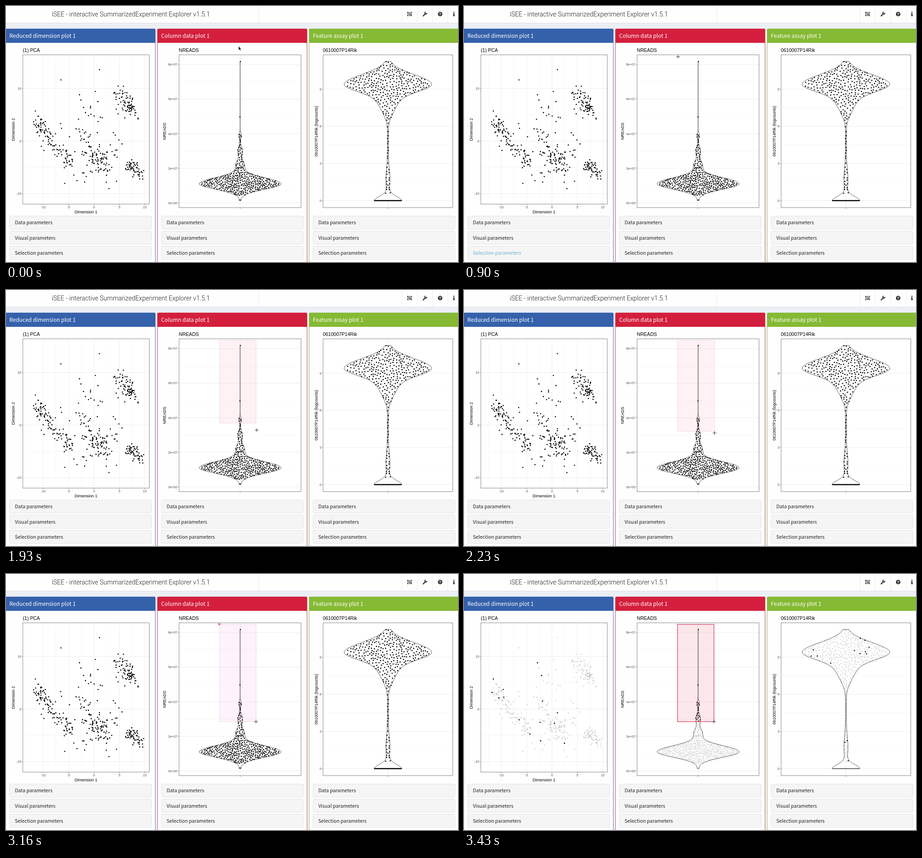
Write an HTML page that moves like this. It is 995 by 563 pixels and loops after 4.33 s.

```html
<!DOCTYPE html>
<html lang="en">
<head>
<meta charset="utf-8">
<title>iSEE panels</title>
<style>
html, body { margin: 0; width: 100%; height: 100%; overflow: hidden; background: #ecf0f5; }
svg { display: block; width: 995px; height: 563px; }
text { font-family: "Liberation Sans", Arial, sans-serif; fill: #000; }
.ui { font-family: "Noto Sans CJK JP", "Noto Sans CJK SC", "Noto Sans CJK", "Noto Sans", sans-serif; fill: #222; font-size: 10.75px; }
.head { font-size: 12.05px; fill: #fff; }
.brand { font: 300 14.1px Roboto, "Liberation Sans", sans-serif; fill: #222; }
.title { font-size: 10.6px; }
.axis { font-size: 9px; }
.tick { font-size: 7.2px; fill: #4d4d4d; }
.end { text-anchor: end; }
.mid { text-anchor: middle; }
.major { stroke: #e8e8e8; stroke-width: .8; }
.minor { stroke: #efefef; stroke-width: .5; }
.mark { stroke: #555; stroke-width: .7; }
.frame { fill: none; stroke: #6a6a6a; stroke-width: .8; }
.violin { fill: none; stroke: #3a3a3a; stroke-width: .85; }
</style>
</head>
<body>
<svg id="stage" viewBox="0 0 995 563"></svg>
<script>
const LOOP = 4330;

// ---------- helpers ----------
function rng(seed) {
  return () => {
    seed = (seed + 0x6d2b79f5) | 0;
    let z = Math.imul(seed ^ (seed >>> 15), 1 | seed);
    z = (z + Math.imul(z ^ (z >>> 7), 61 | z)) ^ z;
    return ((z ^ (z >>> 14)) >>> 0) / 4294967296;
  };
}
const rand = rng(20);
const gauss = () => Math.sqrt(-2 * Math.log(1 - rand())) * Math.cos(2 * Math.PI * rand());
const clamp = (v, lo, hi) => Math.min(hi, Math.max(lo, v));
const lerp = (a, b, p) => a + (b - a) * p;
const ramp = (t, from, to) => clamp((t - from) / (to - from), 0, 1);
const mix = (a, b, p) => `rgb(${a.map((v, i) => Math.round(lerp(v, b[i], p)))})`;
const line = (x1, y1, x2, y2, cls) => `<line x1="${x1}" y1="${y1}" x2="${x2}" y2="${y2}" class="${cls}"/>`;
const text = (x, y, cls, str, extra = "") => `<text x="${x}" y="${y}" class="${cls}" ${extra}>${str}</text>`;
const upright = (x, y, str) => text(x, y, "axis mid", str, `transform="rotate(-90 ${x} ${y})"`);
const rect = (x, y, w, h, attrs) => `<rect x="${x}" y="${y}" width="${w}" height="${h}" ${attrs}/>`;
const range = (from, to, n) => Array.from({ length: n }, (_, i) => lerp(from, to, i / (n - 1)));

const dots = pts => pts.map(([x, y]) => `<circle cx="${x.toFixed(1)}" cy="${y.toFixed(1)}" r="1.35"/>`).join("");
const cloud = (pts, picked) =>
  `<g class="rest">${dots(pts.filter((p, i) => !picked(p, i)))}</g><g>${dots(pts.filter(picked))}</g>`;

// bell curve with separate spreads above and below its peak
const bell = (y, peak, height, up, down = up) =>
  height * Math.exp(-(((y - peak) / (y < peak ? up : down)) ** 2) / 2);

function outline(width, cx, top, bottom) {
  const ys = range(top, bottom, bottom - top + 1);
  const side = dir => ys.map(y => `${(cx + dir * width(y)).toFixed(1)} ${y}`);
  return `<path class="violin" d="M${side(1).concat(side(-1).reverse()).join("L")}Z"/>`;
}

// evenly spaced random points inside a violin: of several tries keep the loneliest
function swarm(width, cx, top, bottom, n) {
  const widest = Math.max(...range(top, bottom, 100).map(width));
  const pick = () => {
    for (;;) {
      const y = lerp(top, bottom, rand()), w = width(y);
      if (rand() * widest < w) return [cx + (2 * rand() - 1) * w * 0.95, y];
    }
  };
  const pts = [];
  while (pts.length < n) {
    let best, far = -1;
    for (let k = 0; k < 14; k++) {
      const c = pick();
      const gap = pts.reduce((m, p) => Math.min(m, (p[0] - c[0]) ** 2 + (p[1] - c[1]) ** 2), 1e9);
      if (gap > far) [best, far] = [c, gap];
    }
    pts.push(best);
  }
  return pts;
}

// ---------- plots ----------
function grid(x0, x1, y1, xs, minorX, first, last, labels) {
  const y0 = 107.3, ys = range(first, last, labels.length), half = (ys[1] - ys[0]) / 2;
  return rect(x0, y0, x1 - x0, y1 - y0, 'fill="#fff"')
    + minorX.map(x => line(x, y0, x, y1, "minor")).join("")
    + ys.slice(1).map(y => line(x0, y - half, x1, y - half, "minor")).join("")
    + xs.map(x => line(x, y0, x, y1, "major") + line(x, y1, x, y1 + 2.5, "mark")).join("")
    + ys.map((y, i) => line(x0, y, x1, y, "major") + line(x0 - 2.5, y, x0, y, "mark")
      + text(x0 - 3.8, y + 2.6, "tick end", labels[i])).join("")
    + rect(x0, y0, x1 - x0, y1 - y0, 'class="frame"');
}

function pcaPlot() {
  const pts = [];
  const add = (x, y) => pts.push([clamp(x, 49, 303), clamp(y, 121, 421)]);
  const blob = (n, cx, cy, sx, sy, tilt = 0) => {
    for (let i = 0; i < n; i++) {
      const dx = gauss() * sx;
      add(cx + dx, cy + dx * tilt + gauss() * sy);
    }
  };
  for (let i = 0; i < 105; i++) {
    const u = rand() ** 1.2;
    add(72 + 78 * u ** 1.3 + gauss() * 7, 250 + 105 * u + gauss() * 10);
  }
  blob(36, 180, 298, 16, 22);
  blob(48, 206, 338, 15, 14, .2);
  blob(24, 190, 360, 28, 22);
  blob(14, 232, 325, 18, 25);
  blob(22, 175, 225, 55, 50);
  blob(52, 266, 212, 14, 14, .5);
  blob(22, 274, 222, 7, 8, .5);
  blob(56, 282, 359, 10, 9, .6);
  const xs = range(82, 305.5, 5);
  return grid(37, 315.3, 435.7, xs, range(54, 277.5, 5), 412.7, 181.5, [-10, 0, 10])
    + xs.map((x, i) => text(x, 445, "tick mid", (i - 2) * 5)).join("")
    + cloud(pts, ([x], i) => i % 16 === 7 && x < 225)
    + text(37, 101, "title", "(1) PCA") + text(176, 456, "axis mid", "Dimension 1")
    + upright(19, 271.5, "Dimension 2");
}

function readsPlot() {
  const cx = 515.4;
  const width = y => .1 + bell(y, 391, 90, 13.4, 12) + bell(y, 350, 9, 10) + bell(y, 319, 5, 10)
    + bell(y, 285, 2.8, 5) + bell(y, 428, 1.1, 4);
  const pts = swarm(width, cx, 282, 417, 366).concat([[516, 122], [515, 244], [515.3, 426.5]]);
  return grid(381, 649.6, 443.4, [cx], [], 433, 128.8, ["0e+00", "2e+07", "4e+07", "6e+07", "8e+07"])
    + outline(width, cx, 122, 428) + cloud(pts, ([, y]) => y < 324)
    + text(380.5, 101, "title", "NREADS") + upright(352.3, 275.4, "NREADS");
}

function assayPlot() {
  const cx = 840.8;
  const width = y => 1 + bell(y, 172, 94.5, 21, 17) + bell(y, 212, 17, 16) + bell(y, 238, 4.5, 13)
    + bell(y, 380, 3.4, 22) + bell(y, 429, 29.5, 10);
  const swarmed = swarm(width, cx, 122, 412, 305);
  const zeros = range(811.5, 870, 54).map(x => [x, 428]);
  return grid(698, 983.6, 443.4, [cx], [], 428, 183, [0, 3, 6, 9])
    + outline(width, cx, 122, 428)
    + cloud(swarmed.concat(zeros), ([, y], i) => i % 22 === 5 && y < 420)
    + text(697.5, 101, "title", "0610007P14Rik") + upright(686, 275.4, "0610007P14Rik (logcounts)");
}

// ---------- page ----------
function panel(i, color, title, plot) {
  const x = -0.4 + 334 * i;
  const rows = ["Data", "Visual", "Selection"].map((name, r) => {
    const y = 462 + 33.2 * r;
    return rect(x + 8.4, y, 312.4, 28.8, 'rx="2.5" fill="#f5f5f5" stroke="#dcdcdc" stroke-width=".8"')
      + text(x + 19.8, y + 18.4, "ui", name + " parameters", i === 0 && r === 2 ? 'id="link"' : "");
  }).join("");
  return rect(x, 50.3, 329, 530, `rx="2.2" fill="#fefefe" stroke="${color}" stroke-width=".8"`)
    + `<path fill="${color}" d="M${x - .4} 81V52.5a2.5 2.5 0 0 1 2.5-2.5h324.8a2.5 2.5 0 0 1 2.5 2.5V81Z"/>`
    + text(x + 8, 69.7, "ui head", title) + plot + rows;
}

function header() {
  const seps = [556, ...range(871.7, 972.5, 4)].map(x =>
    `<path d="M${x} 0V37" stroke="#e6e6e6" stroke-width=".8"/>`).join("");
  const corners = [884, 892.6].flatMap(x => [14, 21.2].map(y =>
    rect(x - 1, y - 1, 2, 2, 'fill="#333"'))).join("");
  return rect(0, 0, 995, 37.3, 'fill="#fefefe"')
    + '<path d="M0 37.4H995" stroke="#d9dce2" stroke-width=".8"/>' + seps
    + text(100.8, 23.2, "brand", "iSEE - interactive SummarizedExperiment Explorer v1.5.1")
    + '<g fill="none" stroke="#333" stroke-width=".9"><path d="M884 14h8.6v7.2H884Z"/>'
    + '<path d="M886 15.8h3.4v2.6H886ZM887.6 18.4v1.4h3.4v-2.6h-1.6"/></g>' + corners
    + '<path d="M918.4 21.8L923.2 17" stroke="#333" stroke-width="2.4" stroke-linecap="round"/>'
    + '<path d="M927.2 14.5a3.2 3.2 0 1 1-2.6-2.2l-1.5 1.6.3 1.8 1.8.4Z" fill="#333"/>'
    + '<circle cx="955.7" cy="17.7" r="4.9" fill="#333"/>'
    + text(955.7, 20.8, "mid", "?", 'style="font-size:8.5px;font-weight:bold;fill:#fff"')
    + '<path d="M984.8 12.8h2.5v2.3h-2.5ZM984 16.2h3.3v4.4h.9v1.7H984v-1.7h.9v-2.7H984Z" fill="#333"/>';
}

const stage = document.getElementById("stage");
stage.innerHTML = rect(0, 0, 995, 563, 'fill="#ecf0f5"') + header()
  + panel(0, "#3561ab", "Reduced dimension plot 1", pcaPlot())
  + panel(1, "#d31f3d", "Column data plot 1", readsPlot())
  + panel(2, "#86b934", "Feature assay plot 1", assayPlot())
  + '<rect id="brush" x="470" y="110.7"/>'
  + rect(468.2, 109.2, 2.7, 2.7, 'id="handle" fill="#fff" stroke="#d8204c" stroke-width="1.1"')
  + '<path id="arrow" d="M0 0V8.6L2 6.8 3.4 9.8 4.8 9.2 3.5 6.3H6Z" fill="#111" stroke="#fff" stroke-width=".5"/>'
  + '<path id="cross" d="M-4 0H4M0 -4V4" stroke="#222" stroke-width=".9"/>';

// ---------- motion ----------
const even = p => p, speedUp = p => p * p, slowDown = p => 1 - (1 - p) ** 2;
const LAG = 60; // the brush trails the pointer
const home = [512, 88.5];
const moves = [
  { from: 30, to: 160, end: [492.5, 115], ease: even },
  { from: 300, to: 500, end: [477, 118], ease: even },
  { from: 700, to: 1000, end: [470.5, 110.7], ease: slowDown },
  { from: 1200, to: 1460, end: [510, 136], ease: speedUp },
  { from: 1460, to: 1570, end: [545, 222], ease: slowDown },
  { from: 1760, to: 1960, end: [552, 310], ease: slowDown },
  { from: 2160, to: 2400, end: [550.3, 324.7], ease: even }
];
const pointer = t => moves.reduce((pos, { from, to, end, ease }) => {
  const p = ease(ramp(t, from, to));
  return pos.map((v, i) => lerp(v, end[i], p));
}, home);

const el = id => document.getElementById(id);
const link = el("link"), brush = el("brush"), handle = el("handle"), arrow = el("arrow"), cross = el("cross");
const rest = [...document.querySelectorAll(".rest")];
const show = (node, on) => node.setAttribute("visibility", on ? "visible" : "hidden");
const set = (node, attrs) => Object.entries(attrs).forEach(([k, v]) => node.setAttribute(k, v));

function draw(t) {
  const transform = `translate(${pointer(t).map(v => v.toFixed(2)).join(" ")})`;
  set(arrow, { transform });
  set(cross, { transform });
  show(arrow, t < 70);
  show(cross, t >= 70);

  const hover = ramp(t, 320, 440) - ramp(t, 1230, 1360);
  link.style.fill = mix([34, 34, 34], [114, 175, 210], hover);

  const done = ramp(t, 3200, 3430);
  const [x, y] = pointer(t - LAG);
  show(brush, t >= 1200 + LAG);
  set(brush, {
    width: Math.max(0, x - 470),
    height: Math.max(0, y - 110.7),
    fill: mix(t >= 3160 ? [225, 60, 205] : [238, 40, 95], [220, 20, 60], done),
    "fill-opacity": lerp(0.06, 0.1, done),
    stroke: mix([246, 203, 216], [215, 52, 82], done),
    "stroke-width": lerp(0.8, 1.2, done)
  });
  show(handle, t >= 2400 && done < 0.8);
  rest.forEach(g => set(g, { "fill-opacity": lerp(1, 0.17, done) }));
}

const start = performance.now();
function tick() {
  draw((performance.now() - start) % LOOP);
  requestAnimationFrame(tick);
}
tick();
</script>
</body>
</html>
```
